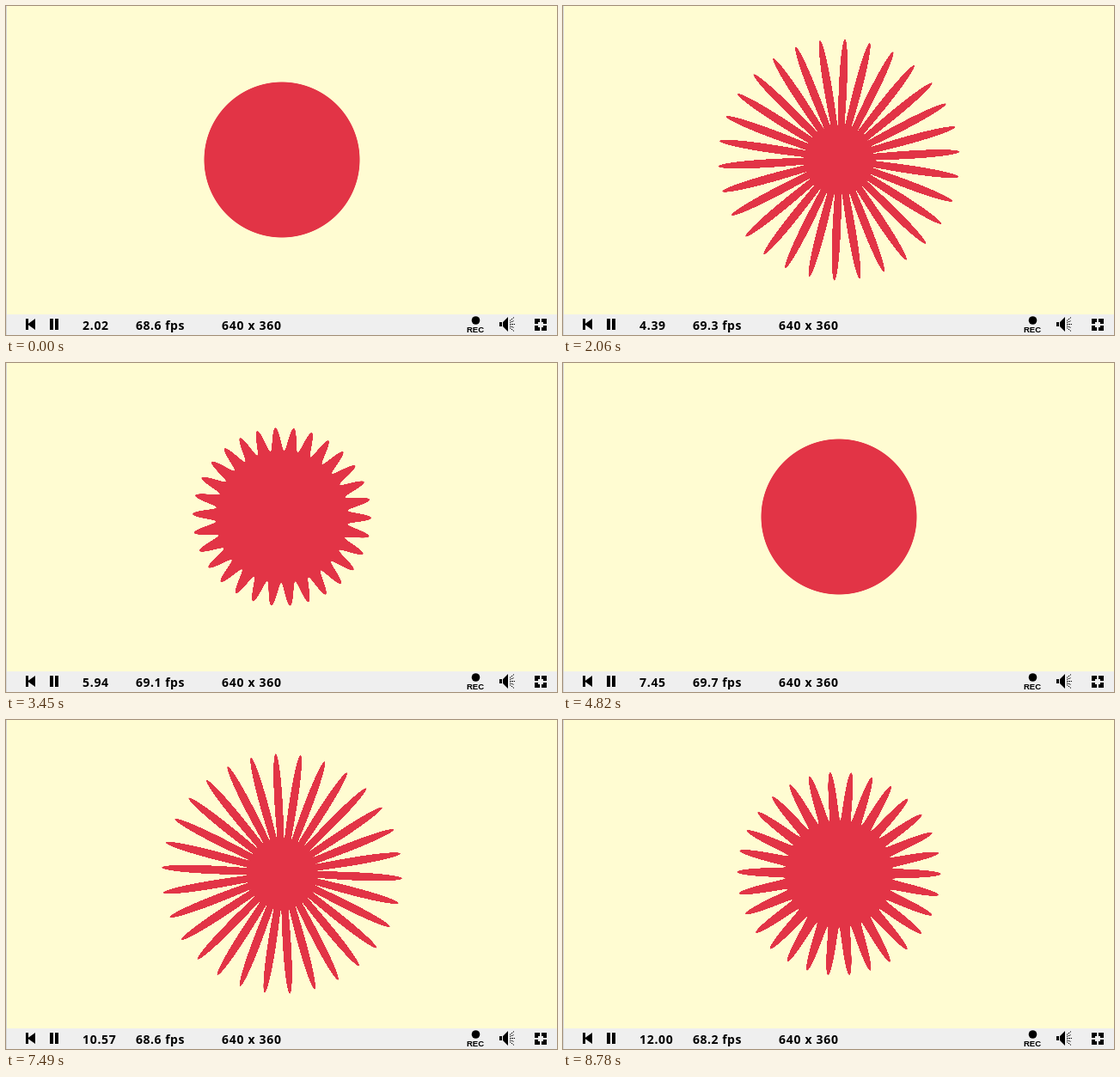
An HTML page with a canvas for the animation above (8800 ms loop, 641x383 px).

```html
<!DOCTYPE html>
<html lang="en">
<head>
<meta charset="utf-8">
<title>Pulsing sun</title>
<style>
  html, body { margin: 0; width: 100%; height: 100%; overflow: hidden; background: #fffcd2; }
  svg { display: block; width: 641px; height: 383px; }
  canvas { position: absolute; left: 176px; top: 34px; }
  text { font: bold 14px "Noto Sans", "Open Sans", sans-serif; letter-spacing: .7px; white-space: pre; }
  #fps { letter-spacing: .5px; }
  .rec { font: bold 9.5px "Liberation Sans", Arial, sans-serif; letter-spacing: 0; }
</style>
</head>
<body>
<svg viewBox="0 0 641 383">
  <rect width="641" height="383" fill="#fffcd2"/>
  <rect y="359" width="641" height="24" fill="#efefef"/>
  <rect width="1" height="383" fill="#d6d6d6"/>

  <!-- rewind, pause -->
  <path d="M23 364h3v13h-3zM34 364v13l-9-6.5zM51 364h4v13h-4zM57 364h4v13h-4z"/>

  <text id="time" x="89" y="377"></text>
  <text id="fps" x="151" y="377"></text>
  <text x="251" y="377">640 x 360</text>

  <!-- record -->
  <circle cx="546.5" cy="366" r="4.8"/>
  <text class="rec" x="536" y="380">REC</text>

  <!-- speaker -->
  <path d="M574 368h3v5h-3zM578 368l6-6v17l-6-6z"/>
  <path d="M586 366.5l5-4M586 368.5l5-2M586 370.5h6M586 372.5l5 2M586 374.5l5 4"
        fill="none" stroke="#000" stroke-dasharray="1.6 .8"/>

  <!-- full screen -->
  <path d="M615 364h6v4h-2v2h-4zM629 364v6h-4v-2h-2v-4zM629 378h-6v-4h2v-2h4zM615 378v-6h4v2h2v4z"/>
</svg>
<canvas id="sun" width="290" height="290"></canvas>
<script>
  const LOOP = 8800, SIZE = 290, CENTER = SIZE / 2;
  const RADIUS = 90, SWING = 50.4, EDGE = 1, PETALS = 30;
  const SKEW = 0.9; // the petals fan out from a point slightly up and right of the disc's centre

  // [loop ms, clock seconds, steps to the next entry]
  const clock = [
    [0, 2.02, 76], [2060, 4.39, 27], [2810, 5.26, 71], [4820, 7.45, 76],
    [6890, 9.83, 23], [7490, 10.57, 46], [8780, 12, 0]
  ];
  // one reading per clock second, starting at 2
  const rates = [68.6, 68.9, 69.3, 69.1, 69.4, 69.7, 69.3, 69, 68.6, 68.4, 68.2];

  const [sun, time, fps] = ["sun", "time", "fps"].map(id => document.getElementById(id));
  const ctx = sun.getContext("2d");
  const image = ctx.createImageData(SIZE, SIZE);
  const dist = new Float32Array(SIZE * SIZE);
  const angle = new Float32Array(SIZE * SIZE);

  for (let i = 0; i < dist.length; i++) {
    const x = i % SIZE + 0.5 - CENTER;
    const y = Math.floor(i / SIZE) + 0.5 - CENTER;
    dist[i] = Math.hypot(x, y);
    angle[i] = Math.atan2(y + SKEW, x - SKEW);
    image.data.set([226, 52, 70, 0], i * 4);
  }

  function clockAt(ms) {
    let i = clock.length - 1;
    while (clock[i][0] > ms) i--;
    const [start, from, steps] = clock[i];
    if (!steps) return from;
    const [end, to] = clock[i + 1];
    const step = Math.floor((ms - start) / (end - start) * steps + 1e-6);
    return from + (to - from) * step / steps;
  }

  function smooth(x) {
    x = Math.min(1, Math.max(0, x));
    return x * x * (3 - 2 * x);
  }

  function paint(t) {
    const amp = SWING * smooth(-Math.sin(t));
    for (let i = 0; i < dist.length; i++) {
      const r = RADIUS + amp * Math.sin(PETALS * (t - angle[i]));
      image.data[i * 4 + 3] = 255 * (1 - smooth((dist[i] - r) / EDGE));
    }
    ctx.putImageData(image, 0, 0);
  }

  let shown;
  function draw(now) {
    const t = clockAt(now % LOOP);
    if (t !== shown) {
      shown = t;
      paint(t);
      time.textContent = t.toFixed(2);
      fps.textContent = rates[Math.floor(t + 1e-6) - 2].toFixed(1) + " fps";
    }
  }

  const begin = performance.now();
  function tick() {
    draw(performance.now() - begin);
    requestAnimationFrame(tick);
  }
  tick();
</script>
</body>
</html>
```
